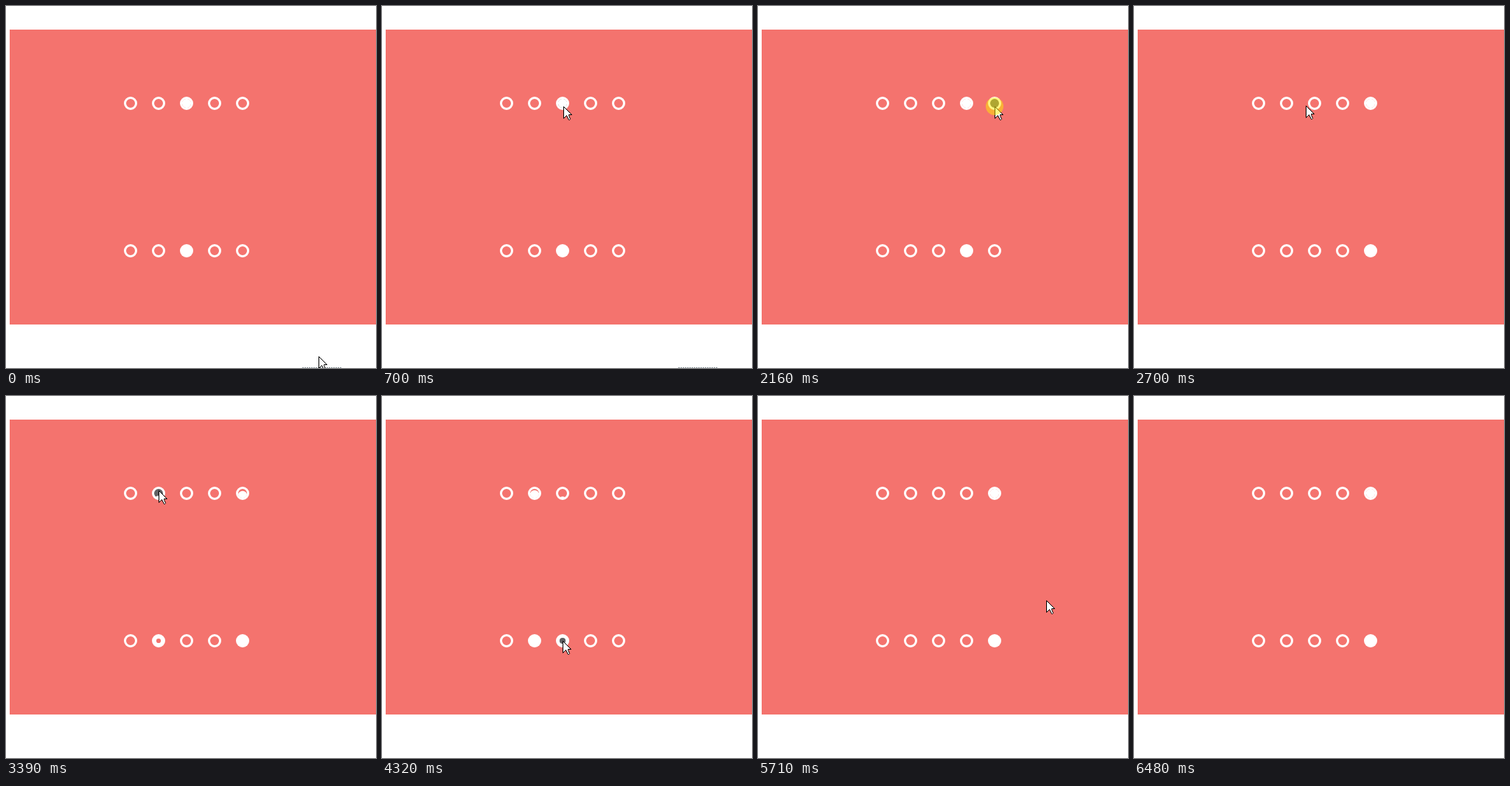
Animation, 502 px wide and 491 px high, one loop 6.78 s. Source, as an HTML page with a canvas:

```html
<!DOCTYPE html>
<html lang="en">
<head>
<meta charset="utf-8">
<title>Dot navigation</title>
<style>
html, body { margin: 0; width: 100%; height: 100%; overflow: hidden; background: #fff; }
canvas { display: block; }
</style>
</head>
<body>
<canvas id="stage" width="502" height="491"></canvas>
<script>
const ctx = document.getElementById('stage').getContext('2d');
const LOOP = 6780, TICK = 77.1, FADE = 300, LEAVE = 6470;
const ROWS = [132, 332];

// Where the pointer rests: arrival, departure, place, and when the button goes down
const rest = (at, until, x, y, down = until) => ({ at, until, x, y, down });
const stops = [
  rest(0, 0, 424, 475),
  rest(700, 790, 246, 136),
  rest(1320, 1540, 279, 133, 1460),
  rest(1930, 2230, 321, 136, 2155),
  rest(2780, 2850, 227, 135),
  rest(3090, 3380, 207, 127, 3300),
  rest(3780, 3780, 215, 367),
  rest(4160, 4317, 245, 332, 4235),
  rest(4620, 4775, 300, 331),
  rest(4920, 5240, 318, 334, 5080),
  rest(5860, 6015, 404, 267, 5935),
  rest(6400, LOOP, 482, 478)
];

const dotX = i => 169 + 38 * i;
const smooth = x => x * x * (3 - 2 * x);
const ease = x => smooth(1 - (1 - x) ** 2);
const mix = (a, b, p) => Math.round(a + (b - a) * p);

function dotAt(x, y) {
  const i = Math.round((x - 169) / 38);
  const row = ROWS.findIndex(r => Math.hypot(x - dotX(i), y - r) < 9);
  return row < 0 || i < 0 || i > 4 ? null : { i, row };
}

// Clicks on a dot select it; the middle one is selected at first
const picks = [{ t: -FADE, i: 2 }];
for (const s of stops) {
  const hit = dotAt(s.x, s.y);
  if (hit && s.down < s.until) picks.push({ t: s.until - 40, i: hit.i });
}

function pointer(t) {
  const n = stops.findIndex(s => t <= s.until);
  const b = stops[n], a = stops[n - 1];
  if (t >= b.at) return [b.x, b.y];
  const p = smooth((t - a.until) / (b.at - a.until));
  return [mix(a.x, b.x, p), mix(a.y, b.y, p)];
}

function levels(t) {
  const n = picks.filter(k => k.t <= t).length - 1;
  const p = ease(Math.min(1, (t - picks[n].t) / FADE));
  const out = [0, 0, 0, 0, 0];
  if (n) out[picks[n - 1].i] = 1 - p;
  out[picks[n].i] = p;
  return out;
}

function disc(x, y, r, color) {
  ctx.fillStyle = color;
  ctx.beginPath();
  ctx.arc(x, y, r, 0, 7);
  ctx.fill();
}

function ring(x, y, width) {
  if (width >= 9) return disc(x, y, 9, '#fff');
  ctx.strokeStyle = '#fff';
  ctx.lineWidth = width;
  ctx.beginPath();
  ctx.arc(x, y, 9 - width / 2, 0, 7);
  ctx.stroke();
}

// Top row: a white disc rises inside the ring
function riseDot(x, y, level) {
  if (level > 0) {
    ctx.save();
    ctx.beginPath();
    ctx.arc(x, y, 6.2, 0, 7);
    ctx.clip();
    disc(x, y + 12.4 * (1 - level), 6.2, '#fff');
    ctx.restore();
  }
  ring(x, y, 3);
}

// Bottom row: the ring thickens inwards
const thickenDot = (x, y, level) => ring(x, y, 3 + 12 * level);

const arrow = new Path2D('M.5 .5V16.5L4.5 12.5L7.5 18.5H8.5L9.5 17.5L7.5 12.5V11.5H11.5Z');

function drawArrow(x, y) {
  ctx.save();
  ctx.translate(x, y);
  ctx.fillStyle = '#fff';
  ctx.fill(arrow);
  ctx.strokeStyle = '#000';
  ctx.lineWidth = 1;
  ctx.stroke(arrow);
  ctx.restore();
}

function draw(t) {
  ctx.fillStyle = '#fff';
  ctx.fillRect(0, 0, 502, 491);
  ctx.fillStyle = '#f4736e';
  ctx.fillRect(5, 32, 497, 400);

  // Dotted underline at the bottom edge until the first click
  if (t < 1460) {
    ctx.fillStyle = '#8a9499';
    for (let x = 402; x < 455; x += 3) ctx.fillRect(x, 490, 2, 1);
  }

  const [px, py] = pointer(t);
  const hover = dotAt(px, py);
  if (hover) disc(dotX(hover.i), ROWS[hover.row], 6.5, '#5f6062');

  levels(t).forEach((level, i) => {
    riseDot(dotX(i), ROWS[0], level);
    thickenDot(dotX(i), ROWS[1], level);
  });

  if (t < LEAVE) drawArrow(px, py);
  if (stops.some(s => t >= s.down && t < s.until && s.until < LEAVE && s.down > s.at)) {
    if (stops.some(s => s.down < s.until && t >= s.down && t < s.until)) disc(px, py, 12, 'rgba(255,235,0,.5)');
  }
}

const start = performance.now();
function tick() {
  const t = (performance.now() - start) % LOOP;
  draw(Math.floor(t / TICK + 0.12) * TICK);
  requestAnimationFrame(tick);
}
tick();
</script>
</body>
</html>
```
